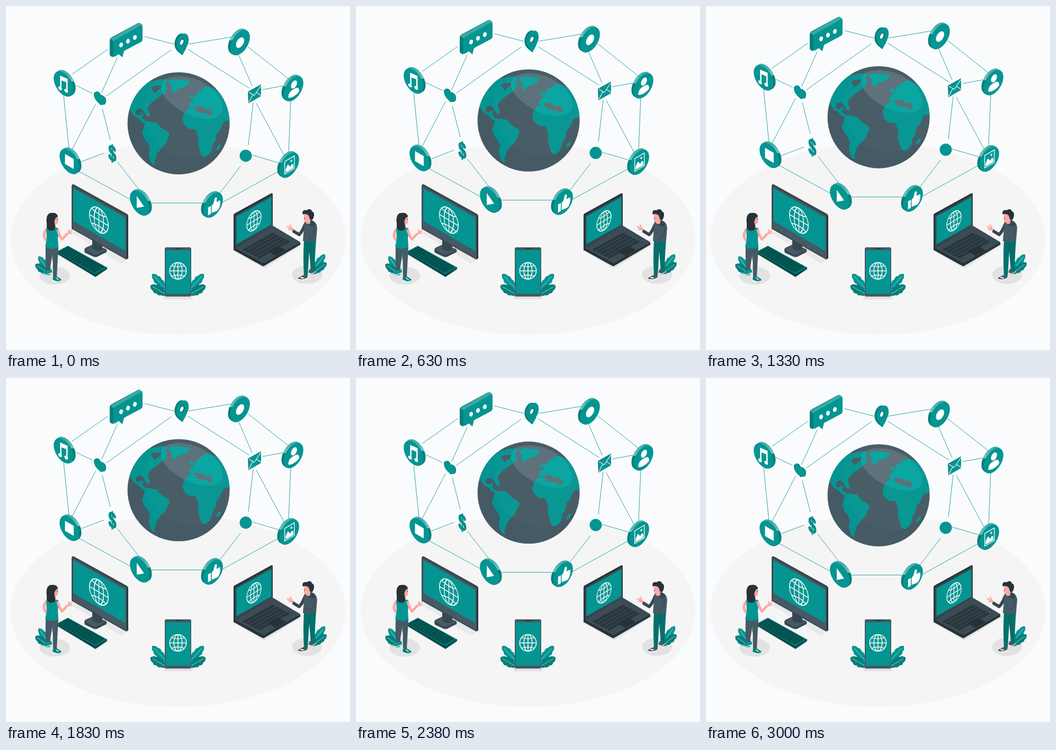
Animation of 650x650 px, one loop 3040 ms. Source, as an HTML page with a canvas:

```html
<!DOCTYPE html>
<html lang="en">
<head>
<meta charset="utf-8">
<title>Connected world</title>
<style>
html, body { margin: 0; width: 100%; height: 100%; overflow: hidden; background: #fafbfd; }
canvas { display: block; width: 650px; height: 650px; }
</style>
</head>
<body>
<canvas id="stage"></canvas>
<script>
const canvas = document.getElementById('stage');
const ctx = canvas.getContext('2d');
const dpr = window.devicePixelRatio || 1;
canvas.width = canvas.height = 650 * dpr;

const BG = '#fafbfd', TEAL = '#049592', DEEP = '#057f7c', INK = '#263238';
const SLATE = '#455a64', DARK = '#37474f', SKIN = '#ffa8a7', SHADE = '#e2e2e2', WHITE = '#fff';
const LOOP = 3040, PEAK = 1470, REST = 3000, LIFT = 12.7;

function fill(d, color) {
  ctx.fillStyle = color;
  ctx.fill(new Path2D(d));
}
function line(d, color, width) {
  ctx.strokeStyle = color;
  ctx.lineWidth = width;
  ctx.lineCap = ctx.lineJoin = 'round';
  ctx.stroke(new Path2D(d));
}
function oval(x, y, rx, ry, color, turn = 0) {
  ctx.fillStyle = color;
  ctx.beginPath();
  ctx.ellipse(x, y, rx, ry, turn, 0, Math.PI * 2);
  ctx.fill();
}
function within(matrix, draw) {
  ctx.save();
  ctx.transform(...matrix);
  draw();
  ctx.restore();
}

function keys(matrix, cols, rows, color) {
  within(matrix, () => {
    ctx.fillStyle = color;
    for (let r = 0; r < rows; r++)
      for (let c = 0; c < cols; c++)
        ctx.fillRect((c + .1) / cols, (r + .1) / rows, .8 / cols, .8 / rows);
  });
}

// Wireframe globe on the device screens
function wireGlobe(x, y, r, sx, skew, width) {
  within([sx, skew, 0, 1, x, y], () => {
    ctx.strokeStyle = WHITE;
    ctx.lineWidth = width;
    ctx.beginPath();
    ctx.arc(0, 0, r, 0, 7);
    ctx.moveTo(r * .5, 0);
    ctx.ellipse(0, 0, r * .5, r, 0, 0, 7);
    for (const s of [-1, 1]) {
      ctx.moveTo(-r * .78, s * r * .63);
      ctx.quadraticCurveTo(0, s * r * .36, r * .78, s * r * .63);
    }
    ctx.moveTo(-r, 0);
    ctx.lineTo(r, 0);
    ctx.moveTo(0, -r);
    ctx.lineTo(0, r);
    ctx.stroke();
  });
}

// Softly lobed leaf growing from its base along +x
function leaf(x, y, len, wide, deg, color) {
  ctx.save();
  ctx.translate(x, y);
  ctx.rotate(deg * Math.PI / 180);
  const n = 4, edge = k => wide * Math.sin(Math.PI * (.1 + .76 * k));
  ctx.beginPath();
  ctx.moveTo(0, 0);
  for (let i = 0; i < n; i++) {
    const a = (i + .6) / n, b = (i + 1) / n;
    ctx.quadraticCurveTo(len * a, -edge(a) * 1.3, len * b, -edge(b) * (i < n - 1 ? .85 : 0));
  }
  for (let i = n - 1; i >= 0; i--) {
    const a = (i + .6) / n, b = i / n;
    ctx.quadraticCurveTo(len * a, edge(a) * 1.3, len * b, edge(b) * (i ? .85 : 0));
  }
  ctx.fillStyle = color;
  ctx.fill();
  line(`M0 0L${len * .85} 0`, 'rgba(255,255,255,.8)', .7);
  ctx.restore();
}

function monitor() {
  fill('M124 429L150 415L236 475L217 487Z', '#e9e9e9');
  fill('M146 464L171 450L194 461L168 477Z', SHADE);
  fill('M148 461Q148 458 152 456L165 450L189 459Q191 461 190 465L172 474Q168 475 164 473L149 466Z', DARK);
  fill('M149 460L165 450L190 460L171 470Q167 471 164 469Z', SLATE);
  fill('M163 440L182 450V461Q172 466 163 458Z', DARK);
  fill('M124 340Q125 336 128 337L229 393Q231 395 231 398V476L227 479L124 421Z', DARK);
  fill('M126 340L229 398V478L126 420Z', SLATE);
  fill('M127.5 344.5L225.5 400V463L127.5 406.5Z', TEAL);
  fill('M228 397L230.5 395V477L228 478.5Z', INK);
  wireGlobe(175.5, 404.5, 22.5, .79, .47, 1.8);
}

function keyboard() {
  fill('M92 468L117 453L194 498L169 513Z', '#e9e9e9');
  fill('M96 464L169 505L191 493V497L169 512L96 468Z', '#034a49');
  fill('M96 464L117 453L191 494L169 507Z', '#05706c');
  keys([69, 38.7, 19, -10.3, 98.5, 464.8], 15, 5, '#044543');
}

function laptop() {
  fill('M427 461L490 429L563 449L488 496Z', '#e4e4e4');
  fill('M430 455L486 485L556 446V451L488 491Q486 492 484 491L430 461Z', INK);
  fill('M430 456L504 415L556 446L487 486Z', '#3b4c56');
  keys([58, -32, 34, 17.5, 445.5, 460], 14, 5, INK);
  fill('M494 463L513 453L529 461L509 472Z', INK);
  fill('M430 395Q430 393 432 392L501 354Q504 353 504 356V415L433 457L430 456Z', INK);
  fill('M432 396L503 356V416L433 456Z', DARK);
  fill('M435.5 397.5L501.5 361V413L435.5 450Z', TEAL);
  wireGlobe(468.5, 406, 17.5, .77, -.47, 1.6);
}

function phone() {
  leaf(303, 536, 40, 7.5, 228, TEAL);
  leaf(304, 546, 36, 8.5, 210, DEEP);
  leaf(347, 536, 40, 7.5, -48, TEAL);
  leaf(346, 546, 36, 8.5, -30, DEEP);
  fill('M298 548H352V554H298Z', SHADE);
  fill('M303 456H347Q350 456 350 459V546Q350 549 347 549H303Q300 549 300 546V459Q300 456 303 456Z', SLATE);
  fill('M302 461.5H348.5V543.5H302Z', TEAL);
  line('M320 458.5H330M333 458.5H334', INK, 1.4);
  wireGlobe(325, 500.5, 15.7, 1, 0, 1.5);
}

function woman() {
  oval(92, 509.5, 29, 17, SHADE);
  leaf(84, 506, 40, 7, 236, TEAL);
  leaf(84, 508, 35, 7.5, 215, DEEP);
  fill('M77 496L83 495L87 500V504L76 509L68 505Q70 502 77 500Z', TEAL);
  line('M68 505L76 508L86 504', WHITE, 1.2);
  fill('M75 455Q74 478 76 499H83L88 466L89 511H96L99 455Z', SLATE);
  line('M87 465L88 480', DARK, .8);
  line('M77 421Q69 431 73 438L79 447', SKIN, 5);
  fill('M76 421Q80 417 88 418L97 419Q101 421 100 427L98 439L99 456Q87 462 74 455L77 441Z', TEAL);
  line('M98 424Q102 437 106 441L115 431', SKIN, 4.7);
  line('M114 432L119 428L125 424M118 429L119 423M119 430L124 429', SKIN, 2.5);
  fill('M87 410H94V419Q90 422 86 418Z', SKIN);
  fill('M87 396Q95 392 98 399L98.5 407Q98 413 91 413Q86 409 87 396Z', SKIN);
  fill('M77 411C75 398 79 390 87 391C93 390 98 394 98 398C95 399 93 401 92 405C90 409 94 415 93 420C92 426 79 427 77 418Z', INK);
  line('M97 402V404', INK, .9);
  fill('M89 511H96L104 516Q106 521 100 522Q94 522 88 518Z', DEEP);
  line('M88 518Q96 523 104 519.5M95 514L99 517', WHITE, 1.5);
}

function man() {
  oval(569, 508, 28.5, 17, SHADE);
  leaf(578, 503, 42, 7, -54, TEAL);
  leaf(578, 506, 35, 7, -37, DEEP);
  fill('M574 497H582L585 503L578 507L571 504Z', SLATE);
  line('M571 504L578 506L585 502', WHITE, 1.2);
  fill('M563 444L586 442Q584 465 583 500H576L573 464L570 510H563Q561 474 563 444Z', '#04706c');
  line('M573 462V450', '#035a57', .8);
  line('M546 425L540 420M541 422L532 417M541 423L534 422M540 420L537 414', SKIN, 2.7);
  line('M565 413Q560 426 554 432L544 426', DARK, 6);
  fill('M564 408L578 405Q587 408 588 419L586 443Q573 449 561 444L563 420Z', SLATE);
  line('M583 417L582 433L572 439', DARK, 1.3);
  fill('M570 407Q576 402 582 408Q587 413 581 417L571 414Z', DARK);
  fill('M565 402H575V410Q571 414 567 410Z', SKIN);
  fill('M563 394Q570 389 576 396Q577 405 572 408Q564 410 563 404Z', SKIN);
  fill('M561 394C558 387 564 384 568 386C573 382 578 385 578 388C584 390 582 397 581 400C579 406 575 406 574 402L572 396Q568 391 561 394Z', INK);
  line('M564 400V402', INK, .9);
  fill('M563 508H570L569 515Q562 519 553 518Q550 516 553 513Z', SLATE);
  line('M552 516.5Q562 519 569 514.5M557 513L562 514', WHITE, 2);
}

const links = [
  [192, 82, 125, 129], [210, 98, 181, 163], [132, 150, 163, 165], [109, 170, 119, 270],
  [169, 186, 125, 271], [182, 194, 197, 253], [143, 294, 185, 278], [137, 312, 236, 366],
  [211, 295, 253, 349], [275, 372.3, 370, 372.3], [312, 83, 190, 170], [262, 58, 317, 72],
  [345, 72, 430, 58], [344, 82, 459, 155], [439, 91, 465, 151], [457, 77, 534, 138],
  [485, 158, 523, 151], [467, 183, 458, 262], [473, 184, 526, 283], [538, 179, 534, 276],
  [466, 282, 514, 296], [443, 303, 403, 355], [409, 371, 514, 313]
];

function continents(land, sea) {
  // North and Central America
  fill('M226 201L230 180L246 160L262 145L276 142L290 139L303 138L305 143L301 148L305 155L302 163L294 168L288 173L282 177L276 182L270 188L268 195L272 205L270 210L265 207L261 200L255 194L248 195L245 200L247 206L252 206L258 202L260 206L257 211L263 217L269 219L264 223L257 220L250 212L242 208L234 196Z', land);
  fill('M274 155Q280 149 287 151L294 150L291 157L286 160L281 165L277 160Z', sea);
  // South America
  fill('M262 223Q268 216 275 219L285 220L291 228L299 234Q309 238 309 244L305 252L301 262L295 267L289 275L285 279L283 288L280 294L282 300Q277 302 273 293L270 281L272 268L268 259L262 252L257 240L260 231Z', land);
  // Greenland
  fill('M308 141L320 138L336 140L347 141L345 148L338 153L327 156L321 162L316 164L312 157L315 151L309 148Z', land);
  // Europe and western Asia
  fill('M345 188L349 180L355 177L353 172L360 168L361 163L368 160L374 154L383 152L395 157L412 170L426 196V215L412 218L407 227L400 233L388 221L382 207L391 205L387 196L376 195L370 190L364 189L357 189L351 194Z', land);
  fill('M347 172L350 166L354 169L352 175Z', land);
  // Africa
  fill('M343 194L356 192L361 199L369 202L380 203L384 211L391 223L397 229L408 226L403 236L397 243L396 254L390 262L389 270L384 280L376 286L370 284L365 270L362 258L364 249L358 233L346 232L337 225L333 214L336 204Z', land);
  fill('M402 262L406 262L405 268L399 273L397 270Z', land);
  fill('M361 193L368 191L373 195L386 194L388 198L380 202L370 200L362 197Z', sea);
}

function earth() {
  const x = 326.1, y = 221.7, r = 96.5, shine = '#5f717a';
  const gloss = new Path2D('M293 152C294 133 323 129 348 135C379 142 402 164 408 184C413 203 402 213 382 213C354 213 327 199 311 184C300 174 292 163 293 152Z');
  oval(x, y, r, r, SLATE);
  ctx.save();
  ctx.beginPath();
  ctx.arc(x, y, r, 0, 7);
  ctx.clip();
  continents(TEAL, SLATE);
  oval(349, 198, 89, 89, 'rgba(255,255,255,.02)');
  ctx.clip(gloss);
  ctx.fillStyle = shine;
  ctx.fill(gloss);
  continents('#0ba5a2', shine);
  ctx.restore();
}

// Isometric disc; side -1 faces left, 1 faces right
function badge(x, y, side, draw) {
  const cx = side < 0 ? x + 18.7 : x + 23.3, cy = y + 26.3;
  const rim = ctx.createLinearGradient(cx, cy - 24, cx, cy + 22);
  rim.addColorStop(0, '#3eaca8');
  rim.addColorStop(.42, '#72c3bf');
  rim.addColorStop(.43, DEEP);
  rim.addColorStop(1, DEEP);
  const skew = -side * .5;
  for (let k = 1; k > 0; k -= .125) {
    ctx.beginPath();
    within([.866, skew, 0, 1, cx - side * 4.3 * k, cy - 2.6 * k], () => ctx.arc(0, 0, 21.4, 0, 7));
    ctx.fillStyle = rim;
    ctx.fill();
  }
  within([.866, skew, 0, 1, cx, cy], () => {
    oval(0, 0, 21.4, 21.4, TEAL);
    draw();
  });
}

function note() {
  fill('M-7.5 -12L9 -14V10H6V-6L-4.5 -4.5V12H-7.5Z', WHITE);
  oval(-7.5, 12, 4, 3.2, WHITE, -.2);
  oval(5.8, 10, 4, 3.2, WHITE, -.2);
}
function person() {
  oval(1, -7.5, 6.6, 7, WHITE);
  fill('M-11.5 11C-11 1 -5 1 1 1C8 1 12 3 12.5 11C8 16 -7 16 -11.5 11Z', WHITE);
}
function picture() {
  line('M-10 -12H11V12H-10Z', WHITE, 1.5);
  fill('M-8 10V4L-3 -3L2 4L6 0L9 4V10Z', WHITE);
  oval(4.5, -6, 2, 2, WHITE);
}
function thumb() {
  fill('M-11 -1H-5V14H-11Z', WHITE);
  fill('M-3.3 0L1 -3L3.5 -11Q7 -13 8.3 -9L7.5 -2H14Q17 0 15.5 3Q17 6 14.5 8Q15 11 12.5 13Q11 15 8 15L-3.3 13Z', WHITE);
}

function bubble() {
  fill('M196 65Q196 61 200 59L248 33Q251 31 254 33L258 36L204 67L203 97L198 95Q196 94 196 91Z', DEEP);
  fill('M197 62L249 33Q252 31 254 33L258 36L204 67Z', '#3aa9a5');
  fill('M203 69Q203 66 206 64L254 37Q258 35 258 39V62Q258 66 255 68L223 85L220 97L213 91L207 95Q203 97 203 93Z', TEAL);
  for (const [x, y] of [[217.5, 73.5], [230.5, 66.5], [243.5, 59.5]]) oval(x, y, 3.3, 4.5, WHITE, .35);
}

function pin() {
  fill('M334 52C325 50 318 63 318.5 73C319 83 326 87 333 93L340 81Z', DEEP);
  fill('M336 52C343 51 346 58 345 67C343 78 336 85 334 93C331 86 322 83 322 72C322 62 328 54 336 52Z', TEAL);
  oval(333, 68, 4.2, 6.6, '#046966', .4);
  oval(332.2, 68.4, 2.8, 5.4, BG, .4);
}

function smallIcons() {
  fill('M180 171C178 160 168 159 167 166L178 187L187 186Q192 178 186 171Z', DEEP);
  fill('M178 169C175 161 165 160 166 168C167 177 173 182 179 187C186 187 189 182 188 177C186 169 181 167 178 169Z', TEAL);
  fill('M457 162L482 148V170L458 184Z', DEEP);
  fill('M459 163L482 149V170L459 183Z', TEAL);
  line('M459 163L469 169L482 150M459 182L466 168M482 169L473 163', WHITE, 1.1);
  ctx.font = 'bold 34px "Liberation Sans", Arial, sans-serif';
  ctx.textAlign = 'center';
  ctx.textBaseline = 'alphabetic';
  for (const [dx, color] of [[1.6, DEEP], [0, TEAL]])
    within([.77, .44, 0, 1.25, 200 + dx, 279 - dx * .6], () => {
      ctx.fillStyle = color;
      ctx.fillText('$', 0, 11.5);
    });
  oval(453, 283, 11.5, 11.5, TEAL);
}

function network() {
  line(links.map(([a, b, c, d]) => `M${a} ${b}L${c} ${d}`).join(''), '#2ba5a1', 1);
  earth();
  bubble();
  pin();
  smallIcons();
  badge(90, 121, -1, note);
  badge(101, 267.5, -1, () => fill('M-9.5 -9.5H9.5V9.5H-9.5Z', WHITE));
  badge(234, 346, -1, () => fill('M-6.5 -10V12.5L9.5 2Z', WHITE));
  badge(419, 43, 1, () => oval(0, 0, 9, 9, WHITE));
  badge(520, 130, 1, person);
  badge(512, 274.5, 1, picture);
  badge(368, 350, 1, thumb);
}

function lift(t) {
  return t < PEAK ? LIFT * t / PEAK : LIFT * Math.max(0, (REST - t) / (REST - PEAK));
}

function frame(now) {
  ctx.setTransform(dpr, 0, 0, dpr, 0, 0);
  ctx.fillStyle = BG;
  ctx.fillRect(0, 0, 650, 650);
  oval(325, 440, 316.5, 181.5, '#f5f5f5');
  within([1, 0, 0, 1, 0, -lift(now % LOOP)], network);
  monitor();
  keyboard();
  laptop();
  phone();
  woman();
  man();
  requestAnimationFrame(frame);
}
requestAnimationFrame(frame);
</script>
</body>
</html>
```
